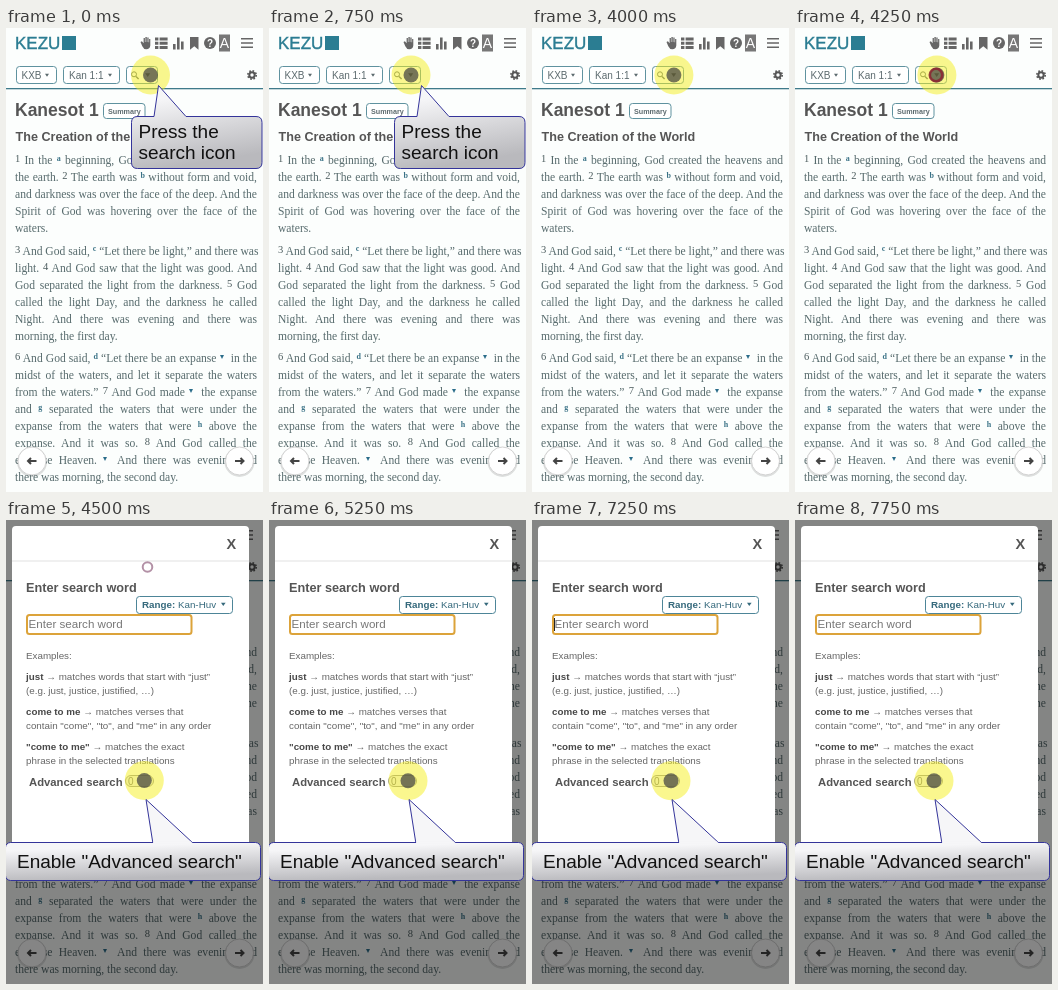
An HTML page that plays this animation: 257x464 px, repeating every 8000 ms.

```html
<!DOCTYPE html>
<html lang="en">
<head>
<meta charset="utf-8">
<title>Search walkthrough</title>
<style>
html, body { margin: 0; width: 100%; height: 100%; overflow: hidden; background: #fcfefd; }
#stage { position: absolute; left: 0; top: 0; width: 257px; height: 464px; overflow: hidden;
  font-family: "Liberation Sans", Arial, sans-serif; }
svg { position: absolute; left: 0; top: 0; display: block; }
#verses { position: absolute; left: 9px; top: 124px; width: 242px; color: #566a6c;
  font: 11.6px/17px "Liberation Serif", "Times New Roman", serif; }
#verses p { margin: 0 0 5.5px; }
#verses span { display: block; height: 17px; white-space: nowrap;
  text-align: justify; text-align-last: justify; }
#verses span:last-child { text-align-last: left; }
#verses i, #verses b { font-weight: 400; font-style: normal; position: relative; line-height: 0; }
#verses b { font-size: 10.5px; top: -2px; color: #4c5c5e; }
#verses i { font-size: 8px; font-weight: 700; top: -3.5px; color: #3a7286; }
#verses u { display: inline-block; border: 2.5px solid transparent; border-top: 4px solid #2b6d8a;
  border-bottom: 0; margin-right: 4px; position: relative; top: -3px; }
.bold { font-weight: 700; }
</style>
</head>
<body>
<div id="stage">
  <div id="verses"></div>

  <svg width="257" height="464" viewBox="0 0 257 464">
    <!-- header -->
    <text x="9" y="21" font-size="17" fill="#2b7d92" stroke="#2b7d92" stroke-width=".4">KEZU</text>
    <rect x="56" y="8" width="14" height="14" fill="#2b7d92"/>
    <g fill="#666">
      <path d="M134.5 14l1.4-.8 1.7 2V10h1.3v4h.5V9h1.4v5h.5V9.6h1.3v4.6h.5V11h1.2v6.5q-.4 3.8-4 3.8-2.7 0-4-3z"/>
      <path d="M149 9.5h3.4v3H149zm0 4.3h3.4v3H149zm0 4.3h3.4v3H149zM153.6 9.5h8v3h-8zm0 4.3h8v3h-8zm0 4.3h8v3h-8z"/>
      <path d="M167 16h2.6v5.5H167zm4-6.5h2.6v12H171zm4 4h2.6v8H175z"/>
      <path d="M184 9h8.5v12.800l-4.200-3.600-4.300 3.600z"/>
      <circle cx="204" cy="15" r="6"/>
      <rect x="213" y="6.500" width="11" height="17" fill="#777"/>
      <path d="M235 10h12v1.500h-12zm0 4.300h12v1.500h-12zm0 4.300h12v1.500h-12z"/>
    </g>
    <g fill="#fff" class="bold" text-anchor="middle">
      <text x="204" y="18.600" font-size="10">?</text>
      <text x="218.500" y="20.300" font-size="14" font-weight="400">A</text>
    </g>
    <!-- toolbar -->
    <g fill="#fff" stroke="#5f929f">
      <rect x="10.500" y="38.500" width="40" height="17" rx="3"/>
      <rect x="57.500" y="38.500" width="56" height="17" rx="3"/>
      <rect x="120.500" y="38.500" width="31" height="17" rx="3"/>
      <rect x="97.500" y="75.500" width="41.500" height="15" rx="3"/>
    </g>
    <g fill="#5c6a6e" font-size="10">
      <text x="15.500" y="50.600">KXB</text>
      <text x="63" y="50.600">Kan 1:1</text>
      <text x="102" y="85.600" font-size="7.200" class="bold">Summary</text>
      <path d="M39 45.800h4l-2 3zM102 45.800h4l-2 3z"/>
    </g>
    <path d="M139.200 45.300h5l-2.500 3.600z" fill="#222"/>
    <g fill="none" stroke="#5c6a6e">
      <circle cx="128" cy="46.300" r="2.500"/>
      <path d="M130 48.400l2.600 2.600" stroke-width="1.400"/>
    </g>
    <g fill="none" stroke="#555">
      <circle cx="246" cy="47" r="2.700" stroke-width="2"/>
      <circle cx="246" cy="47" r="4.200" stroke-width="1.600" stroke-dasharray="1.650 1.650"/>
    </g>
    <rect y="60" width="257" height="1.300" fill="#3f7a8a"/>
    <!-- headings -->
    <g fill="#555" class="bold">
      <text x="9" y="87.500" font-size="17.500">Kanesot 1</text>
      <text x="9.500" y="112.700" font-size="12.600">The Creation of the World</text>
    </g>
    <!-- page buttons -->
    <g id="pager"></g>
  </svg>

  <svg id="modal" width="257" height="464" viewBox="0 0 257 464">
    <rect width="257" height="464" fill="#000" opacity=".48"/>
    <rect x="6" y="6" width="237" height="323" rx="4" fill="#fff"/>
    <rect x="6" y="40.500" width="237" height="1" fill="#e2e2e2"/>
    <g class="bold" fill="#555">
      <text x="220.500" y="28.500" font-size="14.500">X</text>
      <text x="20" y="72" font-size="12.700">Enter search word</text>
      <text x="23" y="266" font-size="11.300">Advanced search</text>
    </g>
    <rect x="130.500" y="76.500" width="96" height="17" rx="3" fill="#fff" stroke="#4d8598"/>
    <text x="136" y="88.300" font-size="9.800" fill="#35697c"><tspan class="bold">Range:</tspan> Kan-Huv</text>
    <path d="M215 82.800h4.600l-2.300 3.200z" fill="#35697c"/>
    <rect x="21" y="95" width="164.500" height="19" rx="2.500" fill="#fff" stroke="#dca33a" stroke-width="2"/>
    <text x="22.600" y="108" font-size="11.600" fill="#777">Enter search word</text>
    <rect id="caret" x="22" y="98" width="1" height="13" fill="#222"/>
    <g id="help" font-size="9.800" fill="#666"></g>
    <rect x="119.500" y="255.500" width="28" height="11" rx="5.500" fill="#f2f2f2" stroke="#999"/>
    <text x="122" y="264.500" font-size="10" fill="#777">0</text>
  </svg>

  <svg width="257" height="464" viewBox="0 0 257 464">
    <defs>
      <linearGradient id="sheen" x2=".25" y2="1">
        <stop offset=".2" stop-color="#f6f6f8"/>
        <stop offset="1" stop-color="#b9b9bd"/>
      </linearGradient>
    </defs>
    <g id="spot">
      <circle r="19.500" fill="#f6f01e" opacity=".5"/>
      <circle r="7.500" fill="#4a4a44" opacity=".75"/>
    </g>
    <circle id="press" cx="141" cy="47" r="6.200" fill="none" stroke="#8c2430" stroke-width="2.600" opacity=".85"/>
    <circle id="ring" cx="141.500" cy="47" r="4.800" fill="#fff" stroke="#b391a6" stroke-width="2"/>
    <g font-size="19" fill="#111">
      <g id="tipA">
        <path d="M131 88.500H148L152.500 57.500 180 88.500H250q6 0 6 6V134.500q0 6-6 6H131.500q-6 0-6-6V94.500q0-6 6-6z" fill="url(#sheen)" stroke="#34349a"/>
        <text x="132.500" y="109.500">Press the</text>
        <text x="132.500" y="131">search icon</text>
      </g>
      <g id="tipB">
        <path d="M147 324L140 279.500 188 324z" fill="#f6f6f8" stroke="#34349a"/>
        <rect x="-.5" y="322.500" width="255" height="38" rx="5" fill="url(#sheen)" stroke="#34349a"/>
        <path d="M147.300 323.500L146.800 321.500H185L187 323.500z" fill="#f6f6f8"/>
        <text x="11" y="348">Enable "Advanced search"</text>
      </g>
    </g>
  </svg>
</div>

<script>
const $ = id => document.getElementById(id);
const LOOP = 8000;

// ^n verse number, _x footnote letter, ~ note marker
const verses = [
  `^1 In the _a beginning, God created the heavens and
the earth. ^2 The earth was _b without form and void,
and darkness was over the face of the deep. And the
Spirit of God was hovering over the face of the
waters.`,
  `^3 And God said, _c “Let there be light,” and there was
light. ^4 And God saw that the light was good. And
God separated the light from the darkness. ^5 God
called the light Day, and the darkness he called
Night. And there was evening and there was
morning, the first day.`,
  `^6 And God said, _d “Let there be an expanse ~ in the
midst of the waters, and let it separate the waters
from the waters.” ^7 And God made ~ the expanse
and _g separated the waters that were under the
expanse from the waters that were _h above the
expanse. And it was so. ^8 And God called the
expanse Heaven. ~ And there was evening and
there was morning, the second day.`
];
const mark = s => s.replace(/\^(\d)/g, '<b>$1</b>').replace(/_(\w)/g, '<i>$1</i>').replace(/~/g, '<u></u>');
$('verses').innerHTML = verses.map(v =>
  '<p>' + v.split('\n').map(l => `<span>${mark(l)}</span>`).join('') + '</p>').join('');

const help = [
  [139, '', 'Examples:'],
  [160, 'just', ' → matches words that start with “just”'],
  [174, '', '(e.g. just, justice, justified, …)'],
  [195, 'come to me', ' → matches verses that'],
  [209, '', 'contain "come", "to", and "me" in any order'],
  [230, '"come to me"', ' → matches the exact'],
  [244, '', 'phrase in the selected translations']
];
$('help').innerHTML = help.map(([y, key, text]) =>
  `<text x="20" y="${y}"><tspan class="bold" fill="#484848">${key}</tspan>${text}</text>`).join('');

const pageButton = (x, dir) => `<g transform="translate(${x} 433) scale(${dir} 1)">
  <circle cy="1" r="15" fill="#000" opacity=".12"/>
  <circle r="14" fill="#fff" stroke="#d2d2d2"/>
  <path d="M-4.5 0H3M1-3L4 0 1 3" fill="none" stroke="#444" stroke-width="2"/></g>`;
$('pager').innerHTML = pageButton(26, -1) + pageButton(233.5, 1);

// [start ms, x, y] of the pointer spot
const path = [
  [0, 144.5, 47], [250, 142, 47], [500, 144.5, 47], [750, 142, 47],
  [1000, 144.5, 47], [1250, 142.4, 47], [1500, 141.9, 47],
  [4500, 138.3, 260.5], [5250, 139, 260.7]
];
// [start, end] of each visible span
const spans = {
  tipA: [[0, 4000]],
  press: [[4250, 4500]],
  modal: [[4500, LOOP]],
  tipB: [[4500, LOOP]],
  ring: [[4500, 4750]],
  caret: [[6250, 6750], [7250, 7750]]
};

function draw(t) {
  const [, x, y] = path.findLast(p => p[0] <= t);
  $('spot').setAttribute('transform', `translate(${x} ${y})`);
  for (const id in spans) {
    const on = spans[id].some(([a, b]) => t >= a && t < b);
    $(id).style.display = on ? '' : 'none';
  }
}
const start = performance.now();
function tick() {
  draw((performance.now() - start) % LOOP);
  requestAnimationFrame(tick);
}
draw(0);
requestAnimationFrame(tick);
</script>
</body>
</html>
```
